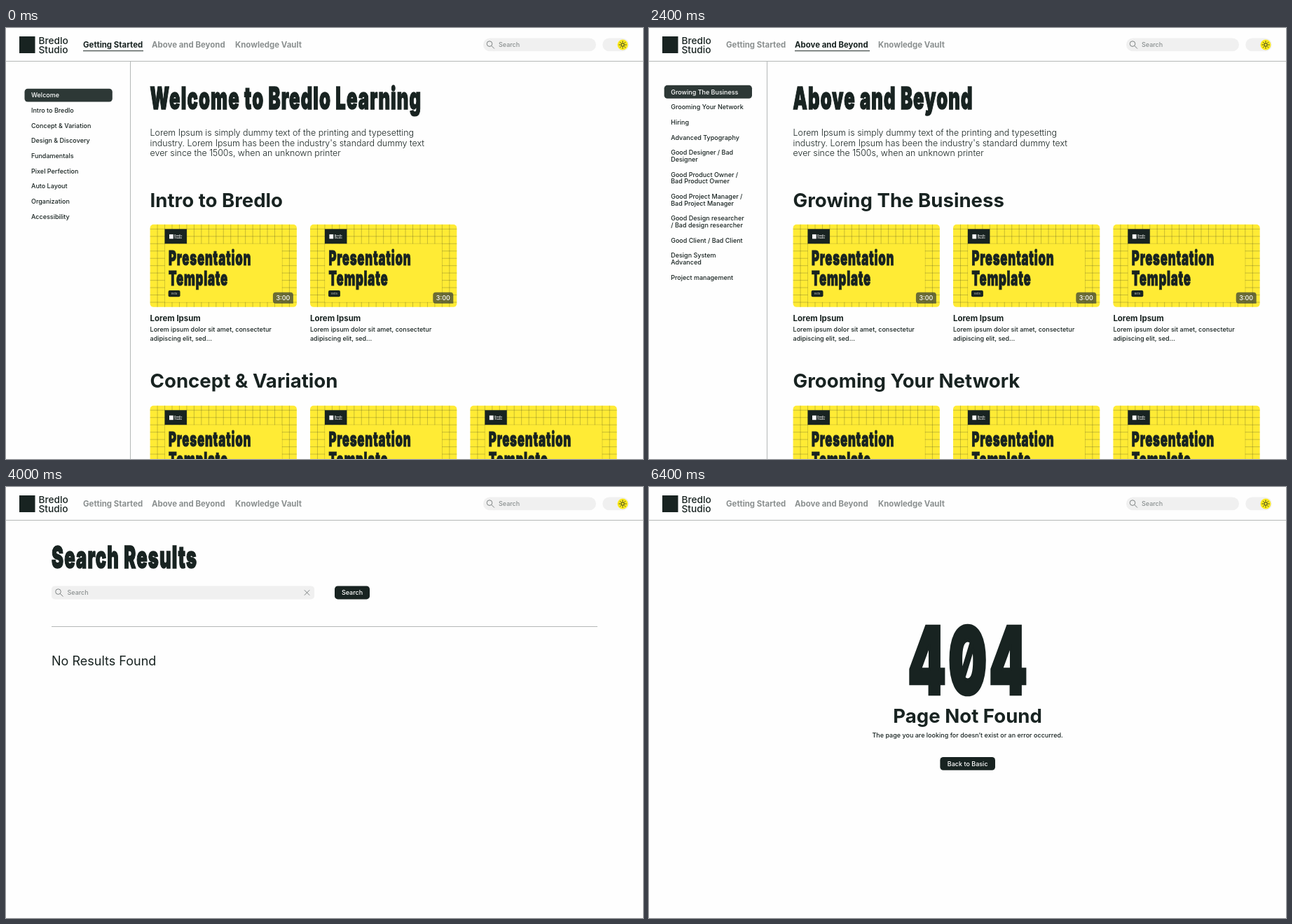
Write an HTML page that moves like this. It is 909 px wide and 616 px high and loops after 7.2 s.

```html
<!DOCTYPE html>
<html lang="en">
<head>
<meta charset="utf-8">
<title>Learning platform</title>
<style>
  html, body { margin: 0; width: 100%; height: 100%; overflow: hidden; background: #fefefe; }
  svg { display: block; width: 100%; height: 100%; }
  text {
    font-family: Inter, "Liberation Sans", sans-serif;
    font-optical-sizing: none;
    font-size: 9px;
    font-weight: 450;
    fill: #182321;
    white-space: pre;
  }
  .bold { font-size: 11.45px; font-weight: 700; }
  .heading { font-size: 27.6px; font-weight: 700; }
  .lead { font-size: 12.4px; font-weight: 350; }
  .result { font-size: 18px; font-weight: 400; }
  .side { font-size: 13.8px; font-weight: 700; }
  .date { font-size: 8.1px; font-weight: 500; }
  .brand { font-size: 13.7px; font-weight: 550; }
  .mini { font-size: 9px; font-weight: 500; fill: #fff; }
  .tag { font-size: 10px; font-weight: 300; fill: #e4e6e5; }
  .display {
    font-weight: 900;
    font-feature-settings: "zero";
    letter-spacing: .045em;
    stroke: #182321;
    stroke-width: .035em;
  }
  .grey { fill: #8b9090; }
  .white { fill: #fff; }
  .icon { fill: none; stroke: #182321; stroke-width: 1; }
  .muted { stroke: #7d8282; }
</style>
</head>
<body>
<svg id="stage" viewBox="0 0 909 616"></svg>
<script>
const INK = '#182321', YELLOW = '#ffeb35', PALE = '#f0f0f0', RULE = '#b4b8b7';
const STEP = 800;
const COVER_W = 526.6, COVER_H = 297, CELL = COVER_W / 20;
const COLUMNS = [205.6, 434, 662.4];
const BAR = 18.9;

const text = (x, y, str, cls = '', anchor = 'start') =>
  `<text x="${x}" y="${y}" class="${cls}" text-anchor="${anchor}">${str.replace(/&/g, '&amp;')}</text>`;
const lines = (x, y, pitch, list, cls) =>
  list.map((str, i) => text(x, y + i * pitch, str, cls)).join('');
const rect = (x, y, w, h, fill, rx = 0, extra = '') =>
  `<rect x="${x}" y="${y}" width="${w}" height="${h}" rx="${rx}" fill="${fill}" ${extra}/>`;
const path = (d, cls = 'icon', extra = '') => `<path d="${d}" class="${cls}" ${extra}/>`;
const ring = (x, y, r, extra = '') => `<circle cx="${x}" cy="${y}" r="${r}" class="icon" ${extra}/>`;
const display = (x, y, size, str, anchor = 'start') =>
  `<text transform="translate(${x} ${y}) scale(.58 1)" class="display" style="font-size:${size}px" text-anchor="${anchor}">${str}</text>`;

function cover() {
  let grid = '';
  for (let i = 1; i < 20; i++) grid += `M${i * CELL} 0V${COVER_H}`;
  for (let y = 16.5; y < COVER_H; y += CELL) grid += `M0 ${y}H${COVER_W}`;
  const top = 16.5 + 2 * CELL;
  return `<g id="cover">
    ${path(grid, 'icon', 'stroke-opacity=".6"')}
    ${rect(2 * CELL + .5, top + .5, 16 * CELL - 1, 8 * CELL - 1, YELLOW)}
    ${rect(2 * CELL, 16.5, 3 * CELL, 2 * CELL, INK)}
    ${rect(69, 35.5, 14.5, 16, '#fff')}
    ${lines(87.5, 43.2, 8.3, ['Bredlo', 'Studio'], 'mini')}
    ${display(66.5, 146.5, 73, 'Presentation')}
    ${display(66.5, 220, 73, 'Template')}
    ${rect(65.5, 237, 42.5, 23.5, INK, 5)}
    ${text(86.7, 252.3, 'Beta', 'tag', 'middle')}
  </g>`;
}

function thumb(x, y, w, dim = 0) {
  const scale = w / COVER_W, h = COVER_H * scale;
  return rect(x, y, w, h, YELLOW, 5) +
    `<use href="#cover" transform="translate(${x} ${y}) scale(${scale})"/>` +
    (dim ? rect(x, y, w, h, '#000', 5, `opacity="${dim}"`) : '');
}

const BLURB = ['Lorem ipsum dolor sit amet, consectetur', 'adipiscing elit, sed...'];
const NARROW_BLURB = ['Lorem ipsum dolor sit amet,', 'consectetur adipiscing elit, sed...'];

function card(x, y, { w = 209.3, dim = 0, inset = 0, blurb = BLURB } = {}) {
  const right = x + w - 5, bottom = y + w * COVER_H / COVER_W;
  const badge = `M${right} ${bottom - 5}h-25a4 4 0 0 1 -4 -4v-8a4 4 0 0 1 4 -4h21a4 4 0 0 1 4 4z`;
  return thumb(x, y, w, dim) +
    `<path d="${badge}" fill="#2d3836" fill-opacity=".7"/>` +
    text(right - 14.5, bottom - 9.4, '3:00', 'white', 'middle') +
    text(x + inset, bottom + 19.8, 'Lorem Ipsum', 'bold') +
    lines(x + inset, bottom + 35.2, 13.2, blurb);
}
const row = (y, count = 3) => COLUMNS.slice(0, count).map(x => card(x, y)).join('');
const section = (y, title, count) => text(205.6, y - 25.3, title, 'heading') + row(y, count);

const magnifier = (x, y) =>
  path(`M${x + 3.8} ${y}a3.8 3.8 0 1 0 -7.6 0a3.8 3.8 0 1 0 7.6 0M${x + 2.7} ${y + 2.7}l4.2 4.2`, 'icon muted');
const button = (x, y, w, label) =>
  rect(x, y, w, BAR, INK, 4.5) + text(x + w / 2, y + 12.8, label, 'white', 'middle');
const arrow = (x, y, dir) => ring(x, y, 11.8) +
  path(`M${x + 5.2 * dir} ${y}H${x - 5.2 * dir}M${x + .4 * dir} ${y - 4.8}L${x + 5.2 * dir} ${y}L${x + .4 * dir} ${y + 4.8}`);

function header(active) {
  const tabs = [['Getting Started', 110, 86], ['Above and Beyond', 208, 107], ['Knowledge Vault', 327, 94]];
  let rays = '';
  for (let i = 0; i < 8; i++) {
    const c = Math.cos(i * Math.PI / 4), s = Math.sin(i * Math.PI / 4);
    rays += `M${880 + 3.7 * c} ${24 + 3.7 * s}L${880 + 5.4 * c} ${24 + 5.4 * s}`;
  }
  return rect(19, 12, 22.5, 24, INK) + lines(46.5, 23.2, 12.6, ['Bredlo', 'Studio'], 'brand') +
    tabs.map(([label, x, w], i) => text(x, 27.8, label, i === active ? 'bold' : 'bold grey') +
      (i === active ? rect(x, 32.2, w, 1, INK) : '')).join('') +
    rect(681, 14.4, 161, BAR, PALE, 9.4) + magnifier(690, 22.6) + text(703, 27.2, 'Search', 'grey') +
    rect(851.3, 14.4, 37.5, BAR, PALE, 9.4) +
    `<circle cx="880" cy="24" r="7.5" fill="#fdea1c"/>` + ring(880, 24, 2.3) + path(rays) +
    rect(0, 47, 909, 1, RULE);
}

function sidebar(x, y, edge, items, active) {
  let out = rect(edge, 48, 1, 568, RULE);
  items.forEach((item, i) => {
    const rows = item.split('|');
    if (i === active) out += rect(x - 9.5, y - BAR / 2, 125.3, BAR, '#2d3836', 4.5);
    out += lines(x, y + 3.3, 9.7, rows, i === active ? 'white' : '');
    y += 21.65 + 9.7 * (rows.length - 1);
  });
  return out;
}

const BASICS = ['Welcome', 'Intro to Bredlo', 'Concept & Variation', 'Design & Discovery', 'Fundamentals',
  'Pixel Perfection', 'Auto Layout', 'Organization', 'Accessibility'];
const BEYOND = ['Growing The Business', 'Grooming Your Network', 'Hiring', 'Advanced Typography',
  'Good Designer / Bad|Designer', 'Good Product Owner /|Bad Product Owner',
  'Good Project Manager /|Bad Project Manager', 'Good Design researcher|/ Bad design researcher',
  'Good Client / Bad Client', 'Design System|Advanced', 'Project management'];
const LEAD = ['Lorem Ipsum is simply dummy text of the printing and typesetting',
  "industry. Lorem Ipsum has been the industry's standard dummy text",
  'ever since the 1500s, when an unknown printer'];

const intro = title => display(205.6, 116.3, 44, title) + lines(205.6, 154, 14.5, LEAD, 'lead');

function welcome(hovered, dim) {
  const second = hovered
    ? card(429.4, 280.8, { w: 218.6, dim, inset: 4.6, blurb: NARROW_BLURB })
    : card(COLUMNS[1], 280.8);
  return header(0) + sidebar(36, 96.1, 177, BASICS, 0) + intro('Welcome to Bredlo Learning') +
    section(280.8, 'Intro to Bredlo', 1) + second +
    section(hovered ? 545 : 539.7, 'Concept & Variation');
}

const beyondTop = () => header(1) + sidebar(31.2, 91.3, 168, BEYOND, 0) + intro('Above and Beyond') +
  section(280.8, 'Growing The Business') + section(539.7, 'Grooming Your Network');

const beyondNetwork = () => header(1) + sidebar(31.2, 91.3, 168, BEYOND, 1) +
  section(123.3, 'Grooming Your Network') + row(312.2) + section(571.1, 'Hiring');

function search(query, results) {
  return header() + display(65, 116.3, 44, 'Search Results') +
    rect(65, 141.5, 375, BAR, PALE, 4.5) + magnifier(74.5, 149.6) +
    text(87.5, 154.2, query || 'Search', query ? '' : 'grey') +
    path('M425.8 147.3l7.4 7.4m0 -7.4l-7.4 7.4', 'icon muted') +
    button(469, 141.5, 50, 'Search') + rect(65, 199, 779, 1, RULE) + results;
}
const found = () => [0, 1, 2].map(i => card(65 + i * 199.5, 233, { w: 180.5 })).join('');

function lesson() {
  const link = 'M-1 -2.5h-1.5a2.5 2.5 0 0 0 0 5h1.5M1 -2.5h1.5a2.5 2.5 0 0 1 0 5h-1.5M-2 0h4';
  const resources = [
    ['“Calmness via Layout” by Finn|Marlo', 'M-3 -4.5h3.8l2.7 2.7v6.3h-6.5zM.8 -4.5v2.7h2.7'],
    ['Bredlo case studies', 'M-1 -3.5h5.5M-1 0h5.5M-1 3.5h5.5M-5 -3.5l1 1l1.6 -2M-4.5 0h1.5M-4.5 3.5h1.5'],
    ['Wendlo Drive', link],
    ['Wendlo Docs', link],
    ['Another resource', 'M-4.7 -3.8h9.4v7.6h-9.4zM-1 -1.6v3.2l2.6 -1.6z']
  ];
  const list = resources.map(([label, glyph], i) => {
    const y = 170.2 + i * 31.3, rows = label.split('|');
    return ring(682, y, 10.7) + path(glyph, 'icon', `transform="translate(682 ${y})"`) +
      lines(697.3, y + 3.3 - 4.8 * (rows.length - 1), 9.7, rows);
  }).join('');
  return header() + arrow(77, 91.5, -1) + text(115.5, 104.3, 'Calmness via Layout', 'heading') +
    thumb(115.5, 139.5, COVER_W, .3) +
    ring(379, 288.2, 17, 'style="fill:#fff"') + path('M374.5 281v14.6l12.6 -7.3z') +
    text(671, 147, 'Resources', 'side') + list +
    `<circle cx="122.6" cy="458" r="7.2" fill="#eaa2e8"/>
     <circle cx="122.8" cy="456.3" r="2.8" fill="#4a3a36"/>
     <path d="M117.8 463.2a5 4.2 0 0 1 10 0a7.2 7.2 0 0 1 -10 0z" fill="#4a3a36"/>` +
    text(134.7, 462.1, 'Author Name', 'bold') + text(213.3, 461.1, 'last updated on Sept 5, 2022', 'date') +
    lines(115.5, 489.8, 13.2, [
      'Lorem Ipsum is simply dummy text of the printing and typesetting industry. Lorem Ipsum has been the industry’s',
      'standard dummy text ever since the 1500s, when an unknown printer took a galley of type and scrambled it to make a',
      'type specimen book. It has survived']) +
    arrow(127.4, 565.5, -1) + text(146.7, 560.8, 'previous lesson') + text(146.7, 577, 'History & Org', 'bold') +
    arrow(630, 565.5, 1) + text(610.7, 560.8, 'next lesson', '', 'end') +
    text(610.7, 577, 'Concept & Variation: Intro', 'bold', 'end');
}

const missing = () => header() + display(456.3, 295.7, 133, '404', 'middle') +
  text(454.6, 337, 'Page Not Found', 'heading', 'middle') +
  text(454.6, 358.2, 'The page you are looking for doesn’t exist or an error occurred.', '', 'middle') +
  button(415.4, 385.9, 78.6, 'Back to Basic');

const scenes = [
  welcome(false), welcome(true, 0), welcome(true, .21),
  beyondTop(), beyondNetwork(),
  search('', text(65, 255.3, 'No Results Found', 'result')), search('Lorem Ipsum', found()),
  lesson(), missing()
];

const stage = document.getElementById('stage');
stage.innerHTML = `<defs>${cover()}</defs>` +
  scenes.map(body => `<g class="scene" display="none">${body}</g>`).join('');
const groups = [...stage.querySelectorAll('.scene')];

const start = performance.now();
let shown = -1;
function tick() {
  const index = Math.floor((performance.now() - start) / STEP) % groups.length;
  if (index !== shown) {
    groups.forEach((g, i) => g.setAttribute('display', i === index ? 'inline' : 'none'));
    shown = index;
  }
  requestAnimationFrame(tick);
}
tick();
</script>
</body>
</html>
```
